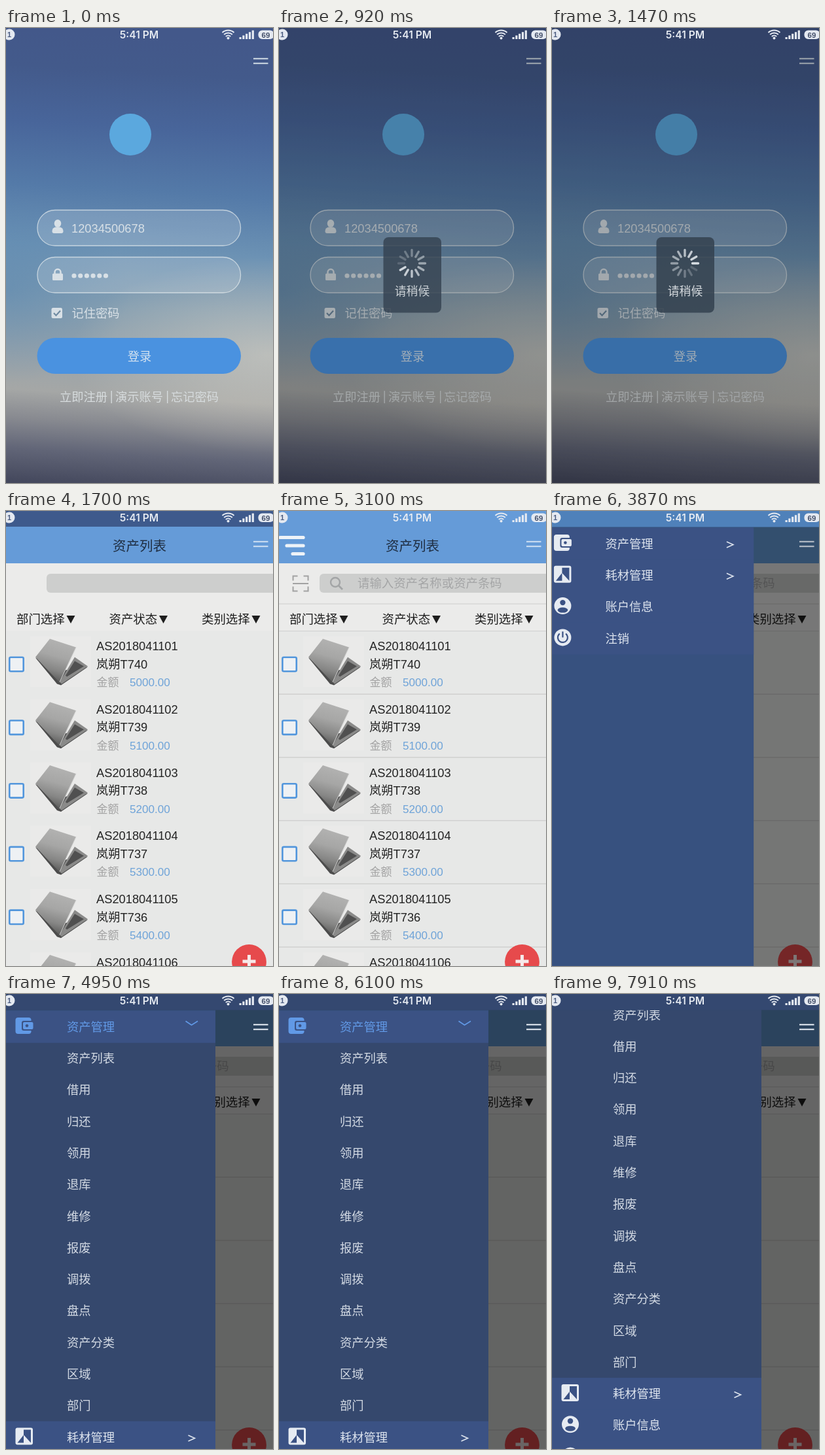
An HTML page with a canvas that plays this animation: 408x696 px, repeating every 7990 ms.

```html
<!DOCTYPE html>
<html lang="zh">
<head>
<meta charset="utf-8">
<title>资产管理</title>
<style>
html, body { margin: 0; width: 100%; height: 100%; overflow: hidden; background: #35486c; }
canvas { display: block; width: 408px; height: 696px; }
</style>
</head>
<body>
<canvas id="stage"></canvas>
<script>
const W = 408, H = 696, LOOP = 7990, TAU = Math.PI * 2;
const FONT = '"Liberation Sans", "Noto Sans CJK SC", "Noto Sans CJK", sans-serif';
const T = { dialog: 770, list: 1620, panel: 3570, expand: 4650, scroll: 6770 };
const ROW = 48.3, ITEM = 96.7, PANEL = 320;
const SUBS = ['资产列表', '借用', '归还', '领用', '退库', '维修', '报废', '调拨', '盘点', '资产分类', '区域', '部门'];

const canvas = document.getElementById('stage');
const c = canvas.getContext('2d');
const dpr = window.devicePixelRatio || 1;
canvas.width = W * dpr;
canvas.height = H * dpr;

const ramp = (t, start, dur) => Math.min(1, Math.max(0, (t - start) / dur));
const easeOut = p => 1 - (1 - p) ** 3;
const mix = (a, b, p) => `rgb(${a.map((v, i) => Math.round(v + (b[i] - v) * p))})`;

function rect(x, y, w, h, fill) {
  c.fillStyle = fill;
  c.fillRect(x, y, w, h);
}

function round(x, y, w, h, r, fill, stroke, lw = 1) {
  c.beginPath();
  c.roundRect(x, y, w, h, r);
  if (fill) { c.fillStyle = fill; c.fill(); }
  if (stroke) { c.strokeStyle = stroke; c.lineWidth = lw; c.stroke(); }
}

function disc(x, y, r, fill) {
  c.beginPath();
  c.arc(x, y, r, 0, TAU);
  c.fillStyle = fill;
  c.fill();
}

function arc(x, y, r, from, to, stroke, lw) {
  c.beginPath();
  c.arc(x, y, r, from, to);
  c.strokeStyle = stroke;
  c.lineWidth = lw;
  c.stroke();
}

function poly(fill, ...p) {
  c.beginPath();
  for (let i = 0; i < p.length; i += 2) c.lineTo(p[i], p[i + 1]);
  c.closePath();
  c.fillStyle = fill;
  c.fill();
}

function path(stroke, lw, ...p) {
  c.beginPath();
  for (let i = 0; i < p.length; i += 2) c.lineTo(p[i], p[i + 1]);
  c.strokeStyle = stroke;
  c.lineWidth = lw;
  c.stroke();
}

// Text is placed by its vertical centre.
function text(s, x, cy, size, fill, align = 'left', font = FONT, weight = 400) {
  c.font = `${weight} ${size}px ${font}`;
  c.textAlign = align;
  c.fillStyle = fill;
  c.fillText(s, x, cy + size * 0.37);
}

function gradient(x0, y0, x1, y1, stops) {
  const g = c.createLinearGradient(x0, y0, x1, y1);
  stops.forEach(([p, col]) => g.addColorStop(p, col));
  return g;
}

function statusBar() {
  disc(5, 10, 8.5, '#e4e9f1');
  text('1', 5, 10, 11, '#4a5c80', 'center', FONT, 700);
  text('5:41 PM', 203.5, 10.5, 15.6, '#e6ebf2', 'center', 'Inter, sans-serif', 600);
  for (const r of [5.5, 9.5, 13.5]) arc(339.5, 17, r, -2.3, -0.84, '#e4e9f1', 2);
  disc(339.5, 15.5, 2, '#e4e9f1');
  for (let i = 0; i < 5; i++) rect(356.5 + i * 4.8, 14 - i * 2.6, 3.2, 3 + i * 2.6, '#e4e9f1');
  round(385.5, 3.5, 24, 13.5, 6, '#e4e9f1');
  text('69', 397, 10.3, 11.5, '#44506a', 'center', FONT, 700);
}

function menuLines(col) {
  rect(378, 45.8, 22.5, 2.2, col);
  rect(378, 53, 22.5, 2.2, col);
}

function glow(x, y, r, squash, rgb, alpha) {
  c.save();
  c.translate(x, y);
  c.scale(1, squash);
  const g = c.createRadialGradient(0, 0, 0, 0, 0, r);
  g.addColorStop(0, `rgba(${rgb},${alpha})`);
  g.addColorStop(1, `rgba(${rgb},0)`);
  disc(0, 0, r, g);
  c.restore();
}

function sky() {
  rect(0, 0, W, H, gradient(0, 0, -40, H, [
    [0, '#43588a'], [0.08, '#435a8b'], [0.2, '#48659a'], [0.34, '#547aa8'],
    [0.47, '#6c92b4'], [0.6, '#869fb1'], [0.72, '#9aa4aa'], [0.79, '#a5a7a6'],
    [0.85, '#898b91'], [0.92, '#616577'], [1, '#41455a']
  ]));
  glow(0, 400, 190, 0.75, '84,132,176', 0.5);
  glow(400, 500, 300, 0.5, '214,208,196', 0.6);
}

function login() {
  const ink = '#d8e0e6', edge = 'rgba(232,238,240,.7)', veil = 'rgba(255,255,255,.16)';
  sky();
  menuLines('#c3cfdc');
  disc(190, 163, 32, '#5ba8de');

  round(48, 278.5, 310.5, 54.5, 27, veil, edge, 1.3);
  round(48, 350.5, 310.5, 54.5, 27, veil, edge, 1.3);
  c.beginPath();
  c.ellipse(79, 299, 5.3, 6, 0, 0, TAU);
  c.fillStyle = ink;
  c.fill();
  round(70.5, 304.5, 17, 9.5, [6, 6, 3, 3], ink);
  text('12034500678', 100, 306, 18.3, ink);

  round(71, 375.5, 16, 10.5, 1.5, ink);
  arc(79, 373.5, 4.5, Math.PI, TAU, ink, 2.4);
  rect(73.3, 373, 2.4, 4, ink);
  rect(82.3, 373, 2.4, 4, ink);
  for (let i = 0; i < 6; i++) disc(104 + i * 9.7, 379, 3.6, ink);

  round(69.5, 428, 16.5, 16, 2.5, ink);
  path('#6f8ba2', 2.2, 73, 436, 76.5, 439.7, 83, 432.5);
  text('记住密码', 100.5, 436.5, 18.3, ink);

  round(47.5, 474, 311.5, 55, 27.5, '#4a92e0');
  text('登录', 204, 502, 18.3, '#d3e2f0', 'center');
  ['立即注册', '演示账号', '忘记密码'].forEach((s, i) => text(s, 82 + i * 85, 564.5, 18.3, '#d6dbdd'));
  rect(160.5, 555, 1.4, 19, '#d6dbdd');
  rect(246, 555, 1.4, 19, '#d6dbdd');
}

function dialog(t) {
  const p = ramp(t, T.dialog, 160);
  if (!p) return;
  c.globalAlpha = p;
  rect(0, 0, W, H, 'rgba(0,0,0,.25)');
  round(159.5, 320, 88.5, 115.5, 8, 'rgba(52,66,80,.86)');
  const lead = Math.floor((t - 1470) / 83) + 3;
  c.lineCap = 'round';
  for (let i = 0; i < 12; i++) {
    const age = (((lead - i) % 12) + 12) % 12;
    const a = i * TAU / 12, x = Math.sin(a), y = -Math.cos(a);
    path(`rgba(235,240,244,${0.9 - age * 0.065})`, 3.4, 203 + x * 11.5, 360 + y * 11.5, 203 + x * 20.5, 360 + y * 20.5);
  }
  c.lineCap = 'butt';
  text('请稍候', 203.5, 402, 17.8, '#d5dade', 'center');
  c.globalAlpha = 1;
}

function laptop(y) {
  rect(37, y + 8, 93, 78, '#eaeae9');
  poly('#4c4c4c', 45, y + 41, 90, y + 60, 125, y + 55, 84, y + 83, 78, y + 81);
  poly('#8a8a89', 82, y + 78, 105, y + 40, 125, y + 54, 85, y + 81);
  poly('#505050', 91, y + 68, 105, y + 46, 119, y + 54, 93, y + 70);
  poly(gradient(78, y + 14, 62, y + 72, [[0, '#b2b2b1'], [0.4, '#a6a6a5'], [0.75, '#868685'], [1, '#5e5e5d']]),
    45, y + 40, 67, y + 12, 107, y + 25, 82, y + 79);
  path('#d2d2d1', 1, 82, y + 78, 107, y + 25);
}

function asset(i, detail) {
  const y = 183.5 + i * ITEM;
  laptop(y);
  round(5.3, y + 40.3, 21.4, 21.4, 2, '#eef1f4', '#5296dc', 2.6);
  text('AS201804110' + (i + 1), 138, y + 23, 18.3, '#242424');
  text('岚朔T' + (740 - i), 138, y + 50.5, 18.3, '#242424');
  text('金额', 138.5, y + 78.5, 17, '#a3a3a3');
  text(5000 + i * 100 + '.00', 189, y + 78.5, 17.1, '#6ea3d8');
  c.globalAlpha = detail;
  rect(0, y + ITEM - 0.7, W, 1.4, '#cfcfce');
  c.globalAlpha = 1;
}

function listPage(t) {
  const detail = ramp(t, 1740, 160);
  rect(0, 0, W, H, '#e7e8e7');
  for (let i = 0; i < 6; i++) asset(i, detail);

  rect(0, 80, W, 103, '#ebebea');
  round(62, 96, 360, 29, 6, '#cdcecd');
  c.globalAlpha = detail;
  const scan = '#a2a2a2';
  for (const [x, dx] of [[21.5, 7], [44.5, -7]])
    for (const [y, dy] of [[99.5, 7], [122.5, -7]]) path(scan, 2, x + dx, y, x, y, x, y + dy);
  path(scan, 2, 21, 111, 45, 111);
  arc(86, 109, 7, 0, TAU, '#a3a5a6', 2.4);
  path('#a3a5a6', 2.8, 91, 114, 97, 120);
  text('请输入资产名称或资产条码', 120, 110.5, 18.4, '#a4a5a6');
  rect(0, 141.5, W, 1.2, '#d2d2d2');
  rect(0, 183, W, 1.2, '#d2d2d2');
  c.globalAlpha = 1;
  ['部门选择', '资产状态', '类别选择'].forEach((s, i) => {
    const x = 16 + i * 141.5;
    text(s, x, 165, 18.4, '#1e1e1e', 'left', FONT, 500);
    poly('#1e1e1e', x + 76.5, 160, x + 89.5, 160, x + 83, 172);
  });

  rect(0, 24, W, 56, '#659bd8');
  rect(0, 0, W, 24, mix([62, 90, 140], [101, 155, 216], ramp(t, 1700, 300)));
  text('资产列表', 204, 53.5, 20.5, '#1f2e42', 'center', FONT, 500);
  menuLines('#c6daf0');
  c.globalAlpha = detail;
  c.lineCap = 'round';
  [2, 12, 21].forEach((x, i) => path('#eef3f8', 5.2, x, 40.5 + i * 12.5, 37, 40.5 + i * 12.5));
  c.lineCap = 'butt';
  c.globalAlpha = 1;

  disc(371.5, 689.5, 26.4, '#e64a4c');
  rect(361.5, 686.5, 20, 5, '#f6e9e9');
  rect(369, 679, 5, 20, '#f6e9e9');
}

// Menu icons are centred on (28, y); "bg" is the row colour behind them.
const icons = {
  wallet(y, col, bg) {
    round(14.5, y - 12.5, 24, 25, 4, col);
    round(24, y - 7.5, 18, 15, 3, bg);
    round(26, y - 5.5, 15.5, 11, 2, col);
    disc(32, y, 2.3, bg);
  },
  supply(y, col, bg) {
    round(14.5, y - 13, 26.5, 26, 3, col);
    poly(bg, 27, y - 10, 38, y - 10, 38, y + 10, 27, y - 2);
    poly(bg, 17.5, y + 10, 27, y - 2, 27, y + 10);
  },
  account(y, col, bg) {
    disc(28, y, 13, col);
    disc(28, y - 5, 4.2, bg);
    c.beginPath();
    c.ellipse(28, y + 6.5, 7.8, 4, 0, 0, TAU);
    c.fillStyle = bg;
    c.fill();
  },
  exit(y, col, bg) {
    disc(28, y, 13, col);
    arc(28, y, 7.5, -0.9, Math.PI + 0.9, bg, 2.2);
    rect(26.9, y - 9, 2.2, 9, bg);
  }
};

function menuRow(label, icon, y, arrow, active) {
  const bg = '#3b5284', ink = active ? '#6199e6' : '#e6ebf2';
  rect(0, y - ROW / 2, PANEL, ROW + 0.5, bg);
  icons[icon](y - 1.5, ink, bg);
  text(label, 93, y, 18.3, active ? '#6199e6' : '#dde4ee');
  if (!arrow) return;
  if (active) path(ink, 1.6, 274.5, y - 8.5, 283.5, y - 2.5, 293, y - 8.5);
  else path('#dde4ee', 1.6, 278.5, y - 3, 288.5, y + 1.5, 278.5, y + 6);
}

function panel(t) {
  const p = ramp(t, T.panel, 450);
  if (!p) return;
  rect(0, 24, W, H - 24, `rgba(0,0,0,${0.57 * Math.sin(p * Math.PI / 2)})`);

  const open = easeOut(ramp(t, T.expand, 300));
  const scroll = 66.5 * easeOut(ramp(t, T.scroll, 110));
  const drop = open * ROW * SUBS.length;
  c.save();
  c.translate(-PANEL * (1 - easeOut(p)), 0);
  c.beginPath();
  c.rect(0, 24.5, PANEL, H);
  c.clip();
  rect(0, 24, PANEL, H, '#37517f');
  c.translate(0, -scroll);
  const top = 50 + ROW / 2;
  if (open) {
    c.save();
    c.beginPath();
    c.rect(0, top, PANEL, drop);
    c.clip();
    rect(0, top, PANEL, drop, '#35486d');
    SUBS.forEach((s, i) => text(s, 93, 50 + ROW * (i + 1), 18.3, '#d3dae4'));
    c.restore();
  }
  menuRow('资产管理', 'wallet', 50, true, open > 0);
  menuRow('耗材管理', 'supply', 50 + ROW + drop, true);
  menuRow('账户信息', 'account', 50 + ROW * 2 + drop);
  menuRow('注销', 'exit', 50 + ROW * 3 + drop);
  c.restore();

  rect(0, 0, W, 24.5, mix([84, 138, 198], [52, 72, 112], ramp(t, 3820, 360)));
  c.globalAlpha = p;
  menuLines('#d3dce6');
  c.globalAlpha = 1;
}

function draw(t) {
  c.setTransform(dpr, 0, 0, dpr, 0, 0);
  if (t < T.list) {
    login();
    dialog(t);
  } else {
    listPage(t);
    panel(t);
  }
  statusBar();
}

const start = performance.now();
function tick() {
  draw((performance.now() - start) % LOOP);
  requestAnimationFrame(tick);
}
tick();
</script>
</body>
</html>
```
